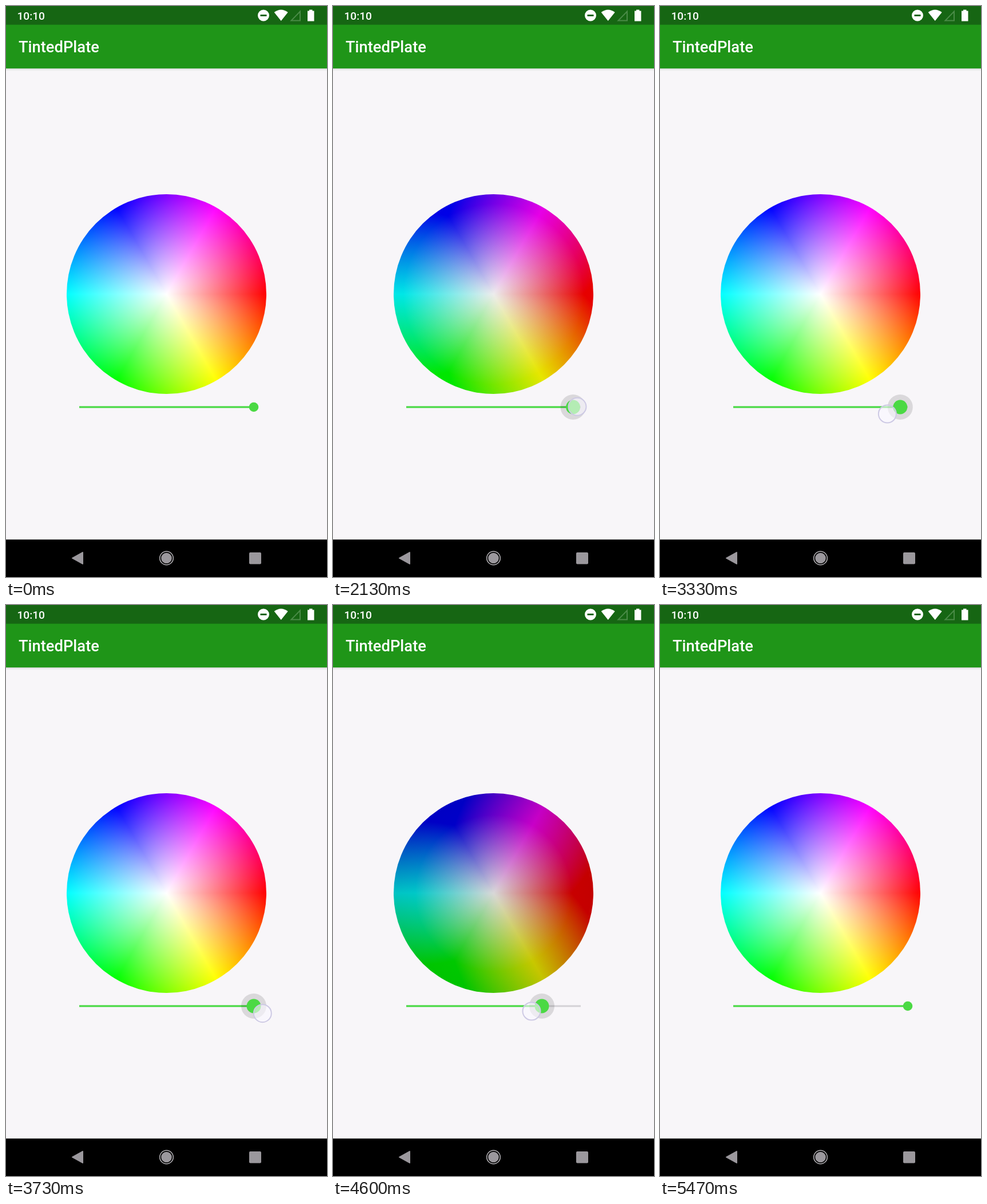
Animation, 561 px wide and 998 px high, one loop 5540 ms. Source, as an HTML page:

```html
<!DOCTYPE html>
<html lang="en">
<head>
<meta charset="utf-8">
<title>Colour picker</title>
<style>
  html, body { margin: 0; width: 100%; height: 100%; overflow: hidden; background: #f8f6f9; }
  .stage { position: relative; width: 561px; height: 998px; overflow: hidden; }
  /* Complement colours plus grey, inverted: a clamped subtraction of brightness. */
  .wheel {
    position: absolute; left: 106px; top: 329px; width: 349px; height: 349px;
    isolation: isolate; filter: invert(1); clip-path: circle(50%);
    background:
      radial-gradient(closest-side, #000, rgba(0, 0, 0, 0)),
      conic-gradient(from 90deg, #0ff, #00f, #f0f, #f00, #ff0, #0f0, #0ff);
  }
  .shade { position: absolute; inset: 0; mix-blend-mode: plus-lighter; }
  svg { position: absolute; left: 0; top: 0; }
  text { font-family: Roboto, sans-serif; font-weight: 500; fill: #fff; }
</style>
</head>
<body>
<div class="stage">
  <div class="wheel"><div class="shade" id="shade"></div></div>
  <svg width="561" height="998" viewBox="0 0 561 998">
    <defs>
      <linearGradient id="drop" x2="0" y2="1">
        <stop stop-color="#000" stop-opacity=".1"/>
        <stop offset="1" stop-color="#000" stop-opacity="0"/>
      </linearGradient>
    </defs>

    <rect y="109" width="561" height="5" fill="url(#drop)"/>
    <rect width="561" height="109.200" fill="#1f9518"/>
    <rect width="561" height="32.700" fill="#166613"/>
    <text x="19.500" y="23.500" font-size="19.100">10:10</text>
    <text x="22" y="81" font-size="27.300">TintedPlate</text>

    <g fill="#fff">
      <circle cx="450" cy="16.500" r="10"/>
      <rect x="444.500" y="15" width="11" height="3" fill="#166613"/>
      <path d="M468.700 11Q480.700 2 492.700 11L480.700 26Z"/>
      <path d="M498.500 25.500H514V9.500Z" fill="none" stroke="#4a8b47" stroke-width="2"/>
      <path d="M530 6.500h5.500v2h3v18h-11.500v-18h3z"/>
    </g>

    <g stroke-width="3">
      <path d="M128 701H433" stroke="#d4d2d6"/>
      <path id="bar" stroke="#46dc41"/>
    </g>
    <circle id="halo" cy="701" r="22"/>
    <circle id="thumb" cy="701" fill="#4bd944"/>
    <circle id="touch" r="15.500" fill="#faf8ff" fill-opacity=".6" stroke="#cdc9e4" stroke-width="2"/>

    <rect y="932.500" width="561" height="65.500"/>
    <g fill="#9b989d">
      <path d="M116 965L134 955V975Z" stroke="#9b989d" stroke-width="2" stroke-linejoin="round"/>
      <circle cx="280.500" cy="965" r="9.300"/>
      <circle cx="280.500" cy="965" r="11.800" fill="none" stroke="#b5b3b7" stroke-width="1.500"/>
      <rect x="425" y="955" width="21" height="20.500" rx="2"/>
    </g>
  </svg>
</div>
<script>
const LOOP = 5540, FPS = 15, LAG = 0.06;
const LEFT = 128, RIGHT = 433;
const PRESS = 26 / FPS, RELEASE = 5.26;

// Finger drag as [seconds, px] points.
const dragX = [
  [1.73, 446], [2, 438], [2.4, 388], [2.8, 298], [2.86, 284], [3, 262],
  [3.33, 396], [3.39, 419], [3.55, 446], [3.7, 449], [4, 414], [4.2, 372],
  [4.26, 358], [4.45, 323], [4.6, 347], [4.66, 365], [4.9, 440], [5.1, 447]
];
const dragY = [[1.73, 700], [2.8, 702], [3.33, 713], [4.2, 714], [4.6, 710], [5.2, 705]];

const $ = id => document.getElementById(id);
const clamp = (v, lo, hi) => Math.min(hi, Math.max(lo, v));
const set = (el, attrs) => {
  for (const key in attrs) el.setAttribute(key, attrs[key]);
};

const slope = (p, i) => (p[i + 1][1] - p[i][1]) / (p[i + 1][0] - p[i][0]);

// Harmonic mean of both slopes, flat at turning points and ends.
function tangent(p, i) {
  if (i === 0 || i === p.length - 1) return 0;
  const a = slope(p, i - 1), b = slope(p, i);
  return a * b > 0 ? 2 * a * b / (a + b) : 0;
}

function sample(p, t) {
  const last = p.length - 1;
  if (t <= p[0][0]) return p[0][1];
  if (t >= p[last][0]) return p[last][1];
  const i = p.findIndex(q => q[0] > t) - 1;
  const d = p[i + 1][0] - p[i][0], u = (t - p[i][0]) / d, w = 1 - u;
  return p[i][1] * w * w * (1 + 2 * u) + p[i + 1][1] * u * u * (3 - 2 * u)
    + d * u * w * (tangent(p, i) * w - tangent(p, i + 1) * u);
}

const thumbAt = t => clamp(sample(dragX, t + LAG), LEFT, RIGHT);

const grey = v => `rgb(${[v, v, v].map(c => c * 255)})`;

// The rim darkens faster than the centre; past full black the stop moves inward.
function shadeWheel(light) {
  const dim = 1 - light;
  const rim = dim * (1.2 + 2.1 * dim);
  const stop = rim > 1 ? light / (rim - dim) : 1;
  $("shade").style.background =
    `radial-gradient(closest-side, ${grey(dim)}, ${grey(Math.min(1, rim))} ${stop * 100}%)`;
}

function draw(ms) {
  const t = Math.floor((ms + 5) * FPS / 1000) / FPS;
  const x = thumbAt(t);
  const press = clamp((t - PRESS) / 0.2, 0, 1) * clamp((5.46 - t) / 0.2, 0, 1);
  const touching = t > PRESS - 0.01 && t < RELEASE;

  shadeWheel((thumbAt(t + LAG) - LEFT) / (RIGHT - LEFT));
  set($("bar"), { d: `M${LEFT} 701H${x}` });
  set($("halo"), { cx: x, "fill-opacity": 0.12 * press });
  set($("thumb"), { cx: x, r: 8.3 + 4.2 * press });
  set($("touch"), {
    cx: sample(dragX, t), cy: sample(dragY, t),
    visibility: touching ? "visible" : "hidden"
  });
}

function tick() {
  draw(performance.now() % LOOP);
  requestAnimationFrame(tick);
}
tick();
</script>
</body>
</html>
```
